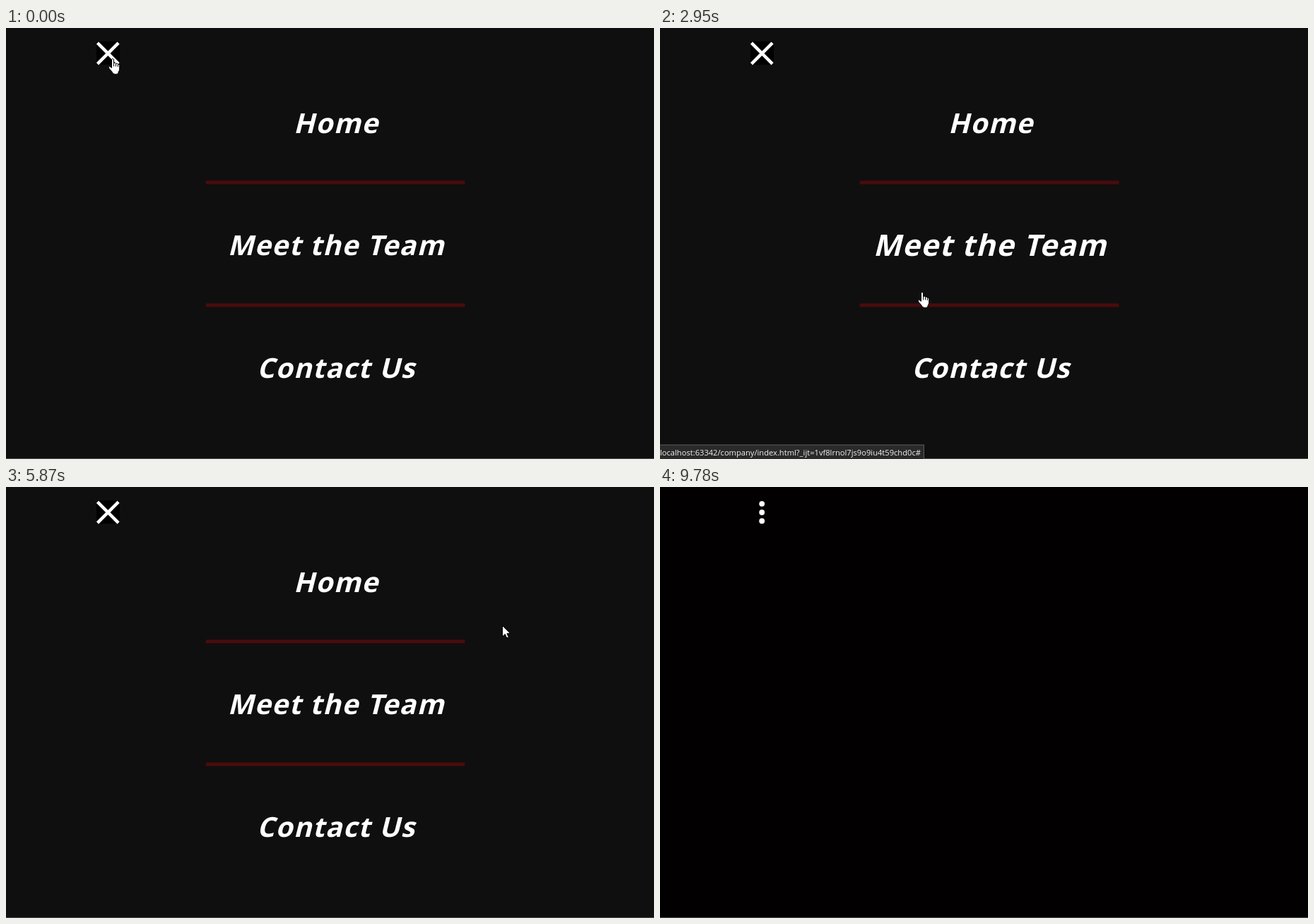
Animation, 917 px wide and 611 px high, one loop 9900 ms. Source, as an HTML page with a canvas:

```html
<!DOCTYPE html>
<html lang="en">
<head>
<meta charset="utf-8">
<title>Menu</title>
<style>
  html, body { margin: 0; width: 100%; height: 100%; overflow: hidden; background: #000; }
  canvas { display: block; }
</style>
</head>
<body>
<canvas id="stage" width="917" height="611"></canvas>
<script>
const W = 917, H = 611, LOOP = 9900;
const ctx = document.getElementById('stage').getContext('2d');

const ITEMS = ['Home', 'Meet the Team', 'Contact Us'];
const URL_TEXT = 'localhost:63342/company/index.html?_ijt=1vf8lrnol7js9o9iu4t59chd0c#';
const MID = 466, PITCH = 173.6, GROW = 0.077;

const linear = u => u;
const easeIn = u => u * u;
const easeOut = u => 1 - (1 - u) * (1 - u);

// Each move bends from the last resting place past `via` to `end`
const START = [151, 43];
const MOVES = [
  { from: 810, to: 1740, steps: 8, via: [347, 67], end: [412, 138] },
  { from: 1860, to: 2280, steps: 4, via: [405, 220], end: [392, 300] },
  { from: 2710, to: 3550, steps: 7, via: [350, 301], end: [386, 462] },
  { from: 3800, to: 4790, steps: 8, via: [381, 444], end: [406, 140] },
  { from: 4940, to: 5870, steps: 8, via: [870, 190], end: [702, 196] },
  { from: 5990, to: 6920, steps: 8, via: [-20, -98], end: [124, 54] },
  { from: 7040, to: 7310, steps: 3, via: [136, 42], end: [140, 31] },
  { from: 7620, to: 8010, steps: 4, via: [137, 49], end: [192, 143], ease: easeIn, closes: true },
  { from: 8850, to: 9780, steps: 8, via: [554, 295], end: [950, 650], ease: linear }
];

const clamp = (v, lo, hi) => Math.min(hi, Math.max(lo, v));
const bend = (a, b, c, u) => (1 - u) * (1 - u) * a + 2 * u * (1 - u) * b + u * u * c;

function hoverAt(x, y) {
  if (x < 283 || x > 649 || y < 75) return -1;
  return y < 219.8 ? 0 : y < 393 ? 1 : 2;
}

const onIcon = (x, y) => x >= 128 && x <= 161 && y >= 19 && y <= 52;

// Every still state of the loop, in order of time
function buildStates() {
  let pos = START, menu = 1, grow = [0, 0, 0];
  const list = [{ t: 0, x: pos[0], y: pos[1], hover: -1, grow, menu, hand: true }];
  for (const { from, to, steps, via, end, ease = easeOut, closes } of MOVES) {
    const gap = (to - from) / (steps - 1);
    for (let i = 0; i < steps; i++) {
      const u = ease((i + 1) / steps);
      const [x, y] = [0, 1].map(k => bend(pos[k], via[k], end[k], u));
      if (closes) menu = 1 - (i + 1) / steps;
      const hover = menu === 1 ? hoverAt(x, y) : -1;
      grow = grow.map((g, k) => g + clamp((k === hover ? 1 : 0) - g, -0.55, 0.55));
      // changes inside a move fall a little ahead of an even beat
      const lead = i > 0 && i < steps - 1 ? 0.3 * gap : 0;
      list.push({ t: from + i * gap - lead, x, y, hover, grow, menu, hand: hover >= 0 || onIcon(x, y) });
    }
    pos = end;
  }
  return list;
}

const STATES = buildStates();
const stateAt = t => STATES.findLast(s => s.t <= t);

function rect(color, x, y, w, h) {
  ctx.fillStyle = color;
  ctx.fillRect(x, y, w, h);
}

function drawItem(text, i, s) {
  const base = 148.5 + PITCH * i;
  const cy = base - 13.5;
  const k = 1 + GROW * s.grow[i];
  const dx = s.hover === 1 && i !== 1 ? 1 : 0;
  ctx.save();
  ctx.translate(MID + 3 + dx, cy);
  ctx.scale(k, k);
  ctx.transform(1, 0, -0.25, 1, -1.9, base - cy);
  ctx.font = '700 39px "Open Sans", "Noto Sans", sans-serif';
  ctx.letterSpacing = '1.3px';
  ctx.fillStyle = '#fff';
  ctx.fillText(text, -ctx.measureText(text).width / 2, 0);
  ctx.restore();
}

function drawCross() {
  rect('#000', 128, 19, 33, 33);
  ctx.save();
  ctx.translate(144.3, 36);
  ctx.rotate(Math.PI / 4);
  rect('#fff', -21, -2.2, 42, 4.4);
  rect('#fff', -2.2, -21, 4.4, 42);
  ctx.restore();
}

function drawDots() {
  ctx.fillStyle = '#fff';
  for (let i = -1; i <= 1; i++) {
    ctx.beginPath();
    ctx.arc(144.2, 36 + 12.2 * i, 3.9, 0, Math.PI * 2);
    ctx.fill();
  }
}

function drawMenu(s) {
  ctx.globalAlpha = s.menu;
  rect('#100f0f', 0, 0, W, H);
  for (let i = 0; i < 2; i++) rect('#4a0b0d', MID - 183.3, 216.5 + 174 * i, 366.6, 5);
  ITEMS.forEach((text, i) => drawItem(text, i, s));
  drawCross();
  ctx.globalAlpha = 1;
}

function drawStatus() {
  rect('#5c5b5c', 0, 590.5, 374, 20.5);
  rect('#2b2a2b', 0, 591.5, 373, 19.5);
  ctx.font = '11.15px "Open Sans", "Noto Sans", sans-serif';
  ctx.letterSpacing = '0px';
  ctx.fillStyle = '#f0f0f0';
  ctx.fillText(URL_TEXT, 0, 606);
}

const HAND = new Path2D(
  'M-1.5 1.5Q0 -.5 1.5 1.5V6.5Q3.5 5.5 4.5 7.3Q6.5 6.5 7.3 8.3Q9.7 8 9.7 10.5V15' +
  'Q9.7 17.5 8 19.5V21.5Q4 24 .5 21.5Q-1 18.5 -5 14.5Q-6.5 12 -4.5 11.6Q-3 11.8 -1.5 13.6Z');
const FINGERS = new Path2D('M1.6 6.5V11.5M4.5 7.5V11.5M7.3 8.5V12');
const ARROW = new Path2D('M.5 .5V16L4.2 12.6L6.7 18L9.3 16.9L6.9 11.7H11.6Z');

function drawPointer({ x, y, hand }) {
  ctx.save();
  ctx.translate(Math.round(x), Math.round(y));
  ctx.lineJoin = 'round';
  ctx.lineWidth = 1;
  ctx.strokeStyle = '#000';
  ctx.fillStyle = '#fff';
  const shape = hand ? HAND : ARROW;
  ctx.fill(shape);
  ctx.stroke(shape);
  if (hand) ctx.stroke(FINGERS);
  ctx.restore();
}

function draw(t) {
  const s = stateAt(t);
  rect('#020000', 0, 0, W, H);
  if (s.menu < 1) drawDots();
  if (s.menu > 0) drawMenu(s);
  rect('#4a4a4a', 0, H - 1, W, 1);
  if (s.hover >= 0) drawStatus();
  drawPointer(s);
}

const start = performance.now();
function tick() {
  draw(Math.max(0, performance.now() - start) % LOOP);
  requestAnimationFrame(tick);
}
tick();
</script>
</body>
</html>
```
